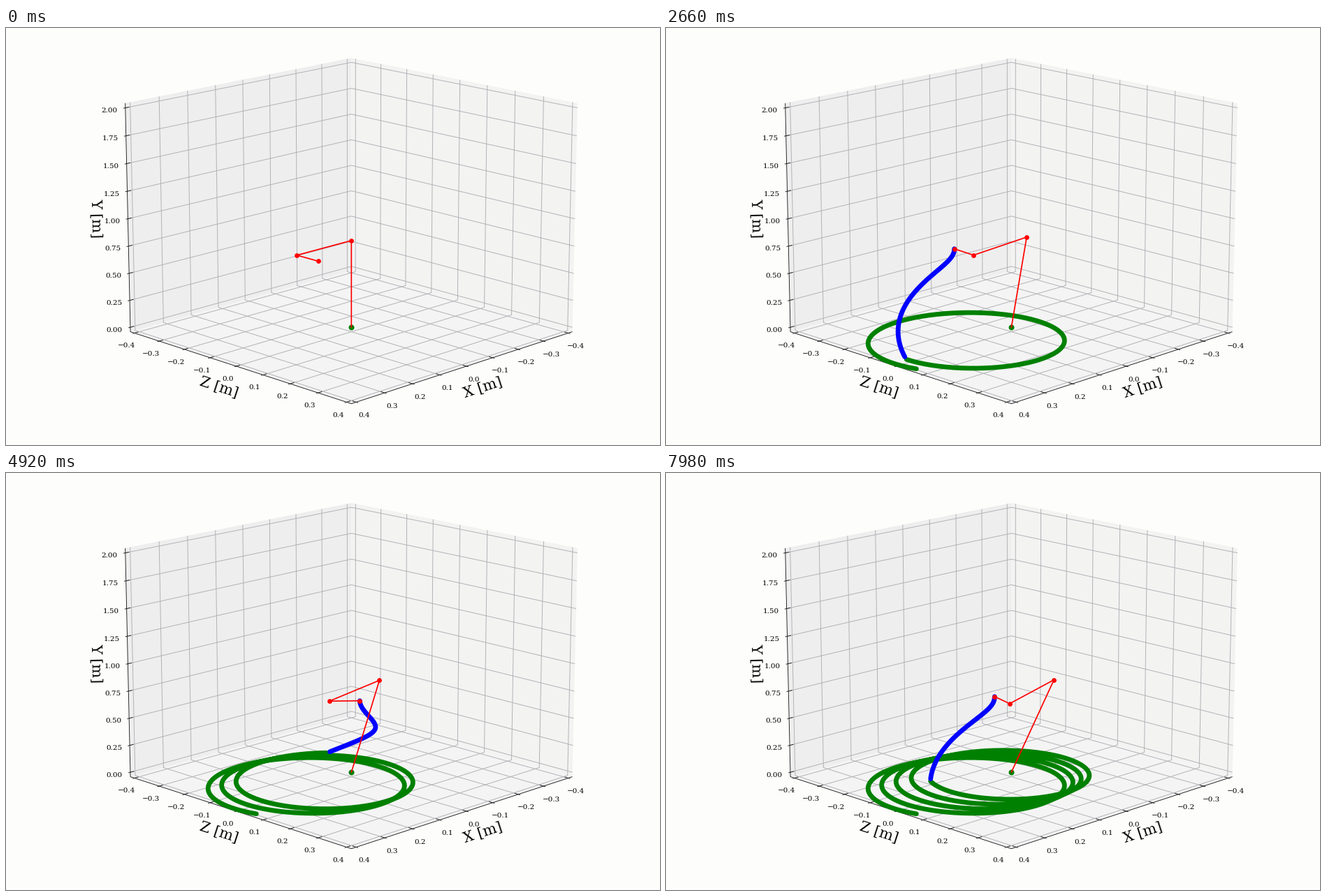
Write a matplotlib script that moves like this. It is 936 px wide and 598 px high and loops after 8000 ms.

```python
import numpy as np
import matplotlib.pyplot as plt
from matplotlib.animation import FuncAnimation
from matplotlib.collections import LineCollection
from matplotlib.patches import Polygon

W, H, DPI = 936, 598, 104
PX = 72 / DPI                      # one pixel in points
TICK_MS, LOOP_MS, HOLD_MS = 20, 8000, 140

# camera
CX, CY, FOCAL, DIST = 494.3, 273.6, 3800, 10
ELEV = np.radians(15)
SIN, COS = np.sin(ELEV), np.cos(ELEV)

# plot box, with the usual margin of 1/48 on every side
EDGE = 0.4 + 0.8 / 48
LOW, HIGH = -2 / 48, 2 + 2 / 48
FLAT_TICKS = np.linspace(-0.4, 0.4, 9)
TALL_TICKS = np.linspace(0, 2, 9)

# arm and jet, per step
SPIN = np.radians(9.56)
RADIUS = 0.08
JET_SPEED = 0.0246
GRAVITY = 0.00217


def project(x, y, z):
    """Turn plot coordinates (y is up) into stage pixels."""
    side = (z - x) * 1.0102
    front = (z + x) * 1.0102
    tall = (y - 1) * 0.42857
    depth = DIST - front * COS - tall * SIN
    return (CX + FOCAL * side / depth,
            CY - FOCAL * (tall * COS - front * SIN) / depth)


def path(*points):
    return [project(*p) for p in points]


def shoulder(m):
    return -0.00104 * m + 5.5e-7 * m ** 2, 0.801 - 1.78e-6 * m ** 2, 0 * m


def elbow(m):
    return (0.2 - 0.00103 * m - 6e-7 * m ** 2,
            0.8 - 0.00058 * m - 2.1e-6 * m ** 2, 0 * m)


def tip(m):
    x, y, z = elbow(m)
    return x + RADIUS * np.sin(SPIN * m), y, z + RADIUS * np.cos(SPIN * m)


def drop_speed(m):
    """Speed of the tip plus the downward push of the jet."""
    return (RADIUS * SPIN * np.cos(SPIN * m) - 0.00103 - 1.2e-6 * m,
            -JET_SPEED - 0.00058 - 4.2e-6 * m,
            -RADIUS * SPIN * np.sin(SPIN * m))


def drops(m):
    """Stage points of all drops let go up to step m, and which have landed."""
    born = np.arange(0, m + 0.1, 0.25)
    x, y, z = tip(born)
    vx, vy, vz = drop_speed(born)
    fall = (vy + np.sqrt(vy ** 2 + 2 * GRAVITY * y)) / GRAVITY
    landed = m - born >= fall
    age = np.minimum(m - born, fall)
    sx, sy = project(x + vx * age,
                     y + vy * age - GRAVITY * age ** 2 / 2,
                     z + vz * age)
    return sx, sy, landed


fig = plt.figure(figsize=(W / DPI, H / DPI), dpi=DPI, facecolor="#fdfdfc")
ax = fig.add_axes([0, 0, 1, 1])
ax.set_xlim(0, W)
ax.set_ylim(H, 0)
ax.axis("off")


def lines(segments, color, width, z):
    ax.add_collection(LineCollection(segments, colors=color,
                                     linewidths=width * PX, zorder=z))


def label(x, y, text, size=10.4, angle=0):
    ax.text(x, y, text, family="DejaVu Serif", size=size * PX, rotation=angle,
            ha="center", va="center", color="black")


def draw_box():
    e = EDGE
    panes = [
        ("#eeeeee", [(e, LOW, -e), (-e, LOW, -e), (-e, HIGH, -e), (e, HIGH, -e)]),
        ("#f3f3f2", [(-e, LOW, -e), (-e, LOW, e), (-e, HIGH, e), (-e, HIGH, -e)]),
        ("#f4f4f4", [(e, LOW, -e), (-e, LOW, -e), (-e, LOW, e), (e, LOW, e)]),
    ]
    for color, corners in panes:
        ax.add_patch(Polygon(path(*corners), fc=color, ec="none", zorder=0))

    grid = []
    for v in FLAT_TICKS:
        grid.append(path((v, HIGH, -e), (v, LOW, -e), (v, LOW, e)))
        grid.append(path((-e, HIGH, v), (-e, LOW, v), (e, LOW, v)))
    for v in TALL_TICKS:
        grid.append(path((e, v, -e), (-e, v, -e), (-e, v, e)))
    lines(grid, "#b1b1b6", 0.95, 1)

    out, inn = 0.8 / 120, 0.8 / 60
    frame = [path((e, HIGH, -e), (e, LOW, -e), (e, LOW, e), (-e, LOW, e))]
    for v in FLAT_TICKS:
        frame.append(path((e + out, LOW, v), (e - inn, LOW, v)))
        frame.append(path((v, LOW, e + out), (v, LOW, e - inn)))
    for v in TALL_TICKS:
        frame.append(path((e + out, v, -e), (e - inn, v, -e)))
    lines(frame, "#1a1a1a", 0.9, 2)


def draw_labels():
    for v in FLAT_TICKS:
        text = "0.0" if abs(v) < 0.01 else f"{v:.1f}".replace("-", "\u2212")
        x, y = project(EDGE, LOW, v)
        label(x - 11.7, y + 18.5, text)
        x, y = project(v, LOW, EDGE)
        label(x + 11, y + 19, text)
    for v in TALL_TICKS:
        x, y = project(EDGE, v, -EDGE)
        label(x - 22.5, y + 4, f"{v:.2f}")
    label(683, 516, "X [m]", 20.8, 18)
    label(305, 516, "Z [m]", 20.8, -18)
    label(128.5, 272.5, "Y [m]", 20.8, -88.6)


def stroke(color, width, z):
    return ax.plot([], [], color=color, lw=width * PX, zorder=z,
                   solid_capstyle="round", solid_joinstyle="round")[0]


draw_box()
draw_labels()
lines([[(0, H - 0.5), (W, H - 0.5)]], "#808080", 1, 2)

base = project(0, 0, 0)
ax.plot(*base, "o", color="green", ms=8 * PX, mew=0, zorder=6)
puddle = stroke("green", 6.8, 4)
jet = stroke("blue", 6.8, 7)
arm = stroke("red", 1.7, 8)
joints = ax.plot([], [], "o", color="red", ms=6.8 * PX, mew=0, zorder=9)[0]


def update(i):
    # the arm moves on in jumps of three steps
    m = 3.0 * ((i * TICK_MS + HOLD_MS - 20) // HOLD_MS)
    sx, sy, landed = drops(m)
    puddle.set_data(sx[landed], sy[landed])
    jet.set_data(sx[~landed], sy[~landed])
    points = [base] + path(shoulder(m), elbow(m), tip(m))
    xs, ys = zip(*points)
    arm.set_data(xs, ys)
    joints.set_data(xs[1:], ys[1:])
    return puddle, jet, arm, joints


anim = FuncAnimation(fig, update, frames=LOOP_MS // TICK_MS,
                     interval=TICK_MS, repeat=True, repeat_delay=0)
plt.show()
```
